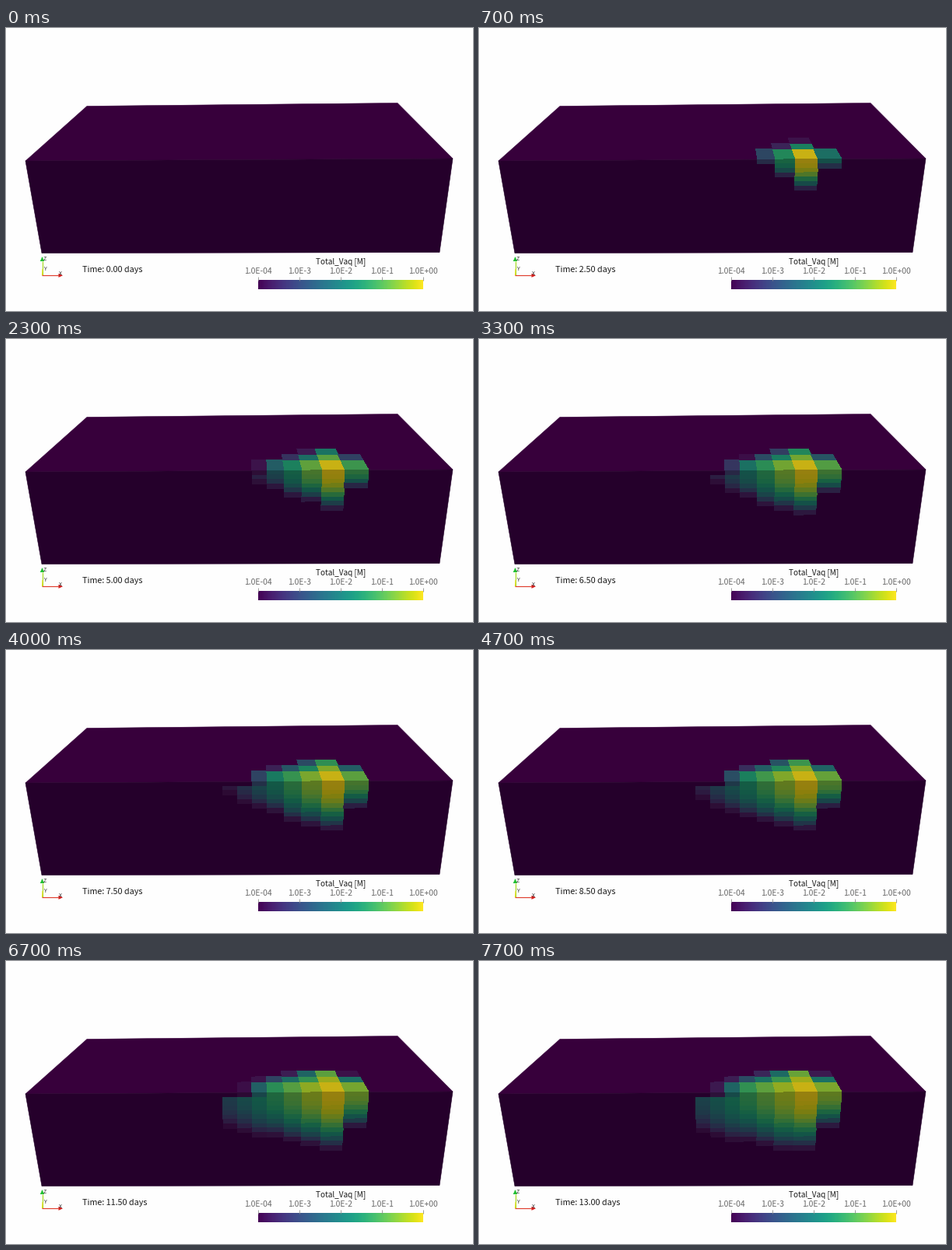
These frames come from a looping animation (600x364 px, 8000 ms). A matplotlib script:

```python
import numpy as np
import matplotlib.pyplot as plt
from matplotlib.animation import FuncAnimation
from matplotlib.collections import PolyCollection

W, H, DPI = 600, 364, 100
PX = 72 / DPI
FONT = "Noto Sans CJK JP"
VIRIDIS = plt.get_cmap("viridis")

# Corners of the block in pixels: (left, right) of each edge
NEAR = np.array([(25, 171), (574, 168)], float)
BACK = np.array([(104, 100.5), (503, 96.5)], float)
BASE = np.array([(46, 289.6), (557, 288.6)], float)

# Grid: column edges on the near edge, depth bands on top, rows in front
EDGES = [278, 297, 316, 336, 358, 381, 407, 436, 466]
BANDS = [0, .19, .287, .387]
ROWS = 21
SOURCE = 6  # column of the injection; the plume drifts to the left

# Warm light on each face
TOP_LIGHT = np.array([.83, .77, .70])
FRONT_LIGHT = np.array([.62, .56, .51])


def point(x, depth, far):
    u = (x - NEAR[0, 0]) / (NEAR[1, 0] - NEAR[0, 0])
    near_pt = NEAR[0] + u * (NEAR[1] - NEAR[0])
    far_pt = far[0] + u * (far[1] - far[0])
    return near_pt + depth * (far_pt - near_pt)


def cell(col, d0, d1, far):
    x0, x1 = EDGES[col], EDGES[col + 1]
    return [point(x0, d0, far), point(x1, d0, far),
            point(x1, d1, far), point(x0, d1, far)]


def plume(day):
    """Cells above the lowest level; levels are log concentrations in 0..1."""
    polys, colors = [], []

    def add(level, poly, light):
        if level > .03:
            polys.append(poly)
            colors.append(light * VIRIDIS(float(level))[:3])

    for col in range(len(EDGES) - 1):
        upstream = col > SOURCE
        dist = 1.4 if upstream else SOURCE - col
        spread = 2.5 if upstream else dist
        # The front flattens and sinks as time goes on
        peak = .98 - dist * (.04 + .77 / day)
        surface = peak - .14 * max(0, dist - 3) ** 1.5
        reach = 4.7 * day ** .41 * max(peak, 0) ** ((3.5 / day) ** .6)
        rows = round(reach * (.65 if upstream else 1))

        for j in range(3):
            level = surface if j == 0 else peak - j ** 1.2 * (1 / day + .1 * spread)
            add(level, cell(col, BANDS[j], BANDS[j + 1], BACK), TOP_LIGHT)
        for r in range(rows):
            level = (peak if r else surface) * (1 - ((r + .5) / rows) ** 2.5)
            add(level, cell(col, r / ROWS, (r + 1) / ROWS, BASE), FRONT_LIGHT)
    return polys, colors


fig = plt.figure(figsize=(W / DPI, H / DPI), dpi=DPI, facecolor="#fefefe")
ax = fig.add_axes([0, 0, 1, 1])
ax.axis("off")


def label(x, y, text, size, color="#1a1a1a", ha="center"):
    return ax.text(x, y, text, fontsize=size * PX, family=FONT, color=color,
                   ha=ha, va="baseline")


def line(xs, ys, color, width):
    ax.plot(xs, ys, color=color, lw=width * PX, solid_capstyle="butt")


# Block
for far, color in ((BACK, "#37003b"), (BASE, "#25002b")):
    ax.fill(*np.array([NEAR[0], NEAR[1], far[1], far[0]]).T,
            color=color, lw=.4, zorder=1, snap=False)
cells = PolyCollection([], linewidths=0, antialiaseds=False, zorder=2)
ax.add_collection(cells)

# Orientation axes
line([46.5, 46.5], [318, 300], "#a5d820", 1.2)
line([46.5, 47], [318, 310], "#e6e02a", 1.2)
line([46, 68], [318.3, 318.3], "#e04030", 1.2)
ax.fill([43.8, 46.5, 49.2], [300, 294, 300], color="#22c032", lw=0)
ax.fill([67.5, 73, 67.5], [315.8, 318.3, 320.8], color="#d81818", lw=0)
for x, y, name in ((50, 299, "Z"), (50, 312.5, "Y"), (70, 318.5, "X")):
    label(x, y, name, 7, "#333333")

# Colour legend
ax.imshow(np.linspace(0, 1, 256)[None], cmap=VIRIDIS, extent=(324, 536, 336, 324),
          aspect="auto", interpolation="nearest")
label(430, 303.5, "Total_Vaq [M]", 10)
for i, text in enumerate(("1.0E-04", "1.0E-3", "1.0E-2", "1.0E-1", "1.0E+00")):
    x = 324 + 53 * i
    line([x, x], [319.5, 325], "#888888", .8)
    label(x, 315.5, text, 10.4, "#6a6a6a")
clock = label(98, 313.7, "", 10.8, ha="left")

ax.set_xlim(0, W)
ax.set_ylim(H, 0)


def update(frame):
    step = (3 * frame + 1) // 10
    day = 1.5 + .5 * step if step else 0
    polys, colors = plume(day) if step else ([], [])
    cells.set_verts(polys)
    cells.set_facecolor(colors if colors else "none")
    clock.set_text(f"Time: {day:.2f} days")
    return cells, clock


anim = FuncAnimation(fig, update, frames=80, interval=100, repeat=True,
                     repeat_delay=0, blit=False)
plt.show()
```
